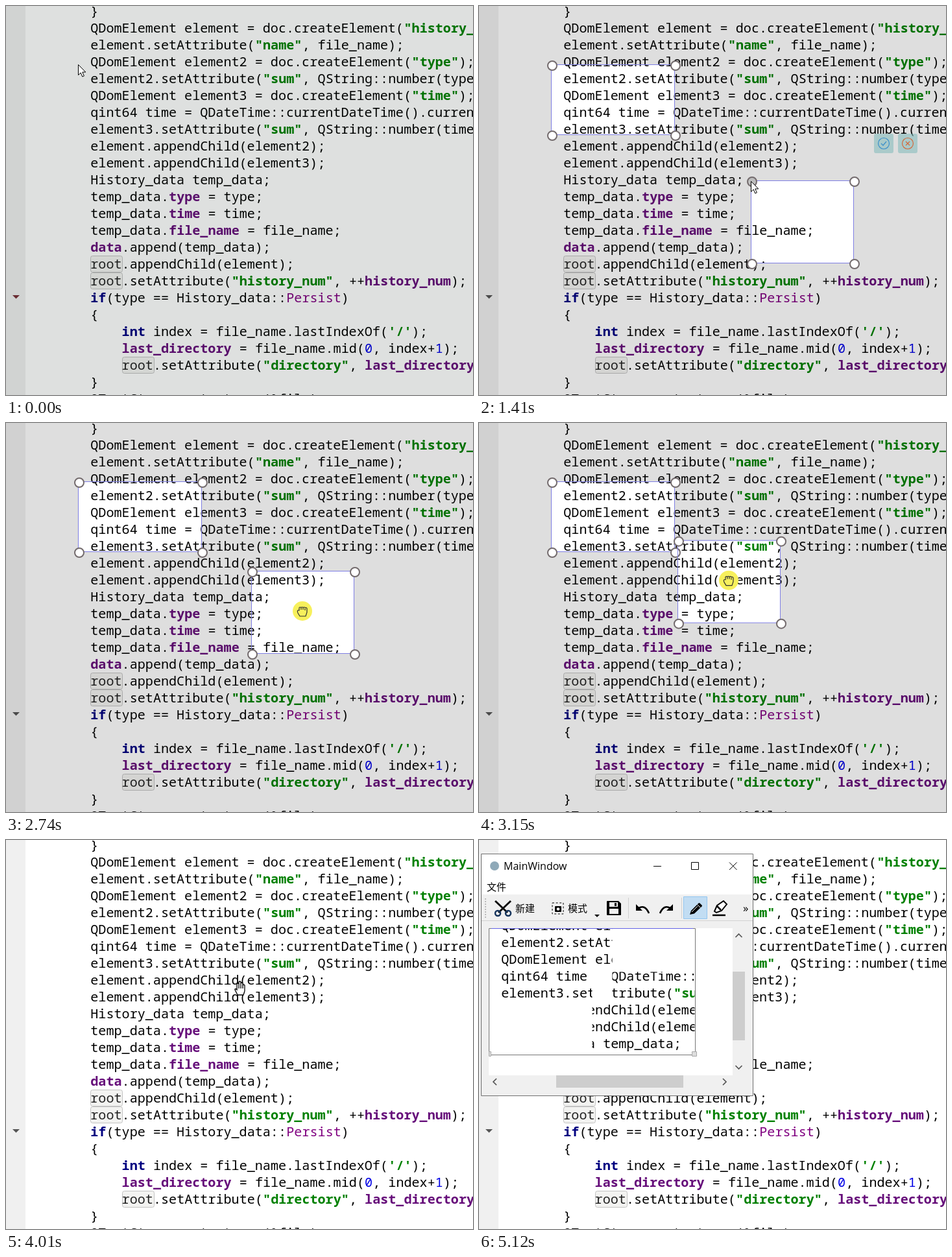
Write an HTML page with a canvas that moves like this. It is 720 px wide and 600 px high and loops after 5.72 s.

```html
<!DOCTYPE html>
<html lang="en">
<head>
<meta charset="utf-8">
<title>Region capture</title>
<style>
html, body { margin: 0; width: 720px; height: 600px; overflow: hidden; background: #fff }
canvas { display: block }
</style>
</head>
<body>
<canvas id="stage" width="720" height="600"></canvas>
<script>
const c = document.getElementById('stage').getContext('2d');
const LOOP = 5720, STEP = 200 / 3, CHAR = 12.08;
const MONO = '20.13px "Noto Sans Mono", monospace';
const PURPLE = '#660e7a';

const code = `}
QDomElement element = doc.createElement("history_data");
element.setAttribute("name", file_name);
QDomElement element2 = doc.createElement("type");
element2.setAttribute("sum", QString::number(type));
QDomElement element3 = doc.createElement("time");
qint64 time = QDateTime::currentDateTime().currentMSecsSinceEpoch();
element3.setAttribute("sum", QString::number(time));
element.appendChild(element2);
element.appendChild(element3);
History_data temp_data;
temp_data.type = type;
temp_data.time = time;
temp_data.file_name = file_name;
data.append(temp_data);
root.appendChild(element);
root.setAttribute("history_num", ++history_num);
if(type == History_data::Persist)
{
    int index = file_name.lastIndexOf('/');
    last_directory = file_name.mid(0, index+1);
    root.setAttribute("directory", last_directory);
}
QTextStream out_stream(&file);`.split('\n');

// Each rule: pattern, colour, bold
const rules = [
  [/"[^"]*"|'.'/, '#008000', true],
  [/\b(?:int|if)\b/, '#000080', true],
  [/(?<=temp_data\.)\w+|^data\b|\bhistory_num|\blast_directory/, PURPLE, true],
  [/\bPersist/, '#800080', false],
  [/\b\d\b/, '#0000e6', false],
  [/\broot\b/, '#222', false],
];
const lexer = new RegExp(rules.map(r => `(${r[0].source})`).join('|'), 'g');
const tokens = code.flatMap((line, row) => {
  const out = [];
  let from = 0;
  const add = (text, col, rule = []) => text.trim() && out.push({ text, row, col, color: rule[1] || '#000', bold: rule[2] });
  for (const m of line.matchAll(lexer)) {
    add(line.slice(from, m.index), from);
    add(m[0], m.index, rules[m.slice(1).findIndex(Boolean)]);
    from = m.index + m[0].length;
  }
  add(line.slice(from), from);
  return out;
});

function box(x, y, w, h, fill, stroke, r = 0) {
  c.beginPath();
  c.roundRect(x, y, w, h, r);
  if (fill) { c.fillStyle = fill; c.fill(); }
  if (stroke) { c.strokeStyle = stroke; c.lineWidth = 1; c.stroke(); }
}

function dot(x, y, r, fill, stroke, width = 1) {
  c.beginPath();
  c.arc(x, y, r, 0, 7);
  if (fill) { c.fillStyle = fill; c.fill(); }
  if (stroke) { c.strokeStyle = stroke; c.lineWidth = width; c.stroke(); }
}

function shape(x, y, d, fill, stroke, width = 1) {
  const path = new Path2D(d);
  c.save();
  c.translate(x, y);
  if (fill) { c.fillStyle = fill; c.fill(path); }
  if (stroke) { c.strokeStyle = stroke; c.lineWidth = width; c.stroke(path); }
  c.restore();
}

function label(text, x, y, font, color = '#000') {
  c.font = font;
  c.fillStyle = color;
  c.fillText(text, x, y);
}

function drawCode() {
  for (const t of tokens) {
    const x = 130.3 + t.col * CHAR, y = 15 + t.row * 26;
    if (t.text === 'root') box(Math.round(x) + .5, y - 19.5, 49, 25, '#f3f3f1', '#c2c2c2', 3);
    label(t.text, x, y, (t.bold ? 'bold ' : '500 ') + MONO, t.color);
  }
}

function drawEditor(foldColor) {
  box(0, 0, 720, 600, '#fff');
  box(0, 0, 30, 600, '#f0f0f0');
  shape(10, 446, 'M0 0h11l-5.5 5.5z', foldColor);
  drawCode();
}

// Overlapping areas cancel out
function areaPath(areas) {
  for (const a of areas) c.rect(a.x, a.y, a.w, a.h);
}

function drawOverlay(areas, tint, hot) {
  c.beginPath();
  c.rect(0, 0, 720, 600);
  areaPath(areas);
  c.fillStyle = tint;
  c.fill('evenodd');
  areas.forEach((a, i) => {
    box(a.x, a.y, a.w, a.h, null, '#7f7fe4');
    for (const dx of [0, a.w]) for (const dy of [0, a.h])
      dot(a.x + dx + 1.5, a.y + dy + 1.5, 7, hot && i && !dx && !dy ? '#bdbdbd' : '#fff', '#736b6d', 2);
  });
}

function drawButtons(x) {
  for (const [dx, color, mark] of [[0, '#3a8fcb', 'M-4 0l3 3 5-6'], [37, '#d4683a', 'M-3-3l6 6M3-3l-6 6']]) {
    box(x + dx - 15, 197, 30, 30, 'rgba(127,186,186,.55)', null, 3);
    dot(x + dx, 212, 8.5, null, color, 1.2);
    shape(x + dx, 212, mark, null, color, 1.2);
  }
}

function pencil(x, y) {
  shape(x, y, 'M0 0l2-6 11.5-11.5q1-1 2 0l3 3q1 1 0 2L7-1.5z', '#000');
  shape(x, y, 'M3-4l9-9M11.5-15.5l5 5', null, '#fff', 1);
}

function arrow(x, y) {
  shape(x, y, 'M.5.5v16l3.7-3.5 2.6 6 2.6-1.1-2.6-5.9h5z', '#fff', '#000');
}

function openHand(x, y) {
  shape(x, y, 'M-4 10l-4-8q0-3 3 0v-9q1.5-2 3 0v-3q1.5-2 3 0v2q2-2 3 0v3q2-1.5 3 0v9l-2 6zM-2-7v7M1-8v8M4-5v5', '#fff', '#000', 1.3);
}

function fistHand(x, y) {
  dot(x, y, 15, '#f7f05c');
  shape(x, y, 'M-4 8l-3-5q-2-5 2-4v-4q1.5-2 3 0 1.5-2.5 3 0 1.5-2 3 0 2-1 3 1v6l-2 6zM-2-5v3M1-5v3M4-4v3', null, '#333', 1.2);
}

function drawToolbar() {
  const cjk = '15px "Noto Sans CJK SC", sans-serif';
  label('文件', 12, 78, cjk);
  label('新建', 56, 111, cjk);
  label('模式', 137, 111, cjk);
  for (let y = 90; y < 121; y += 4) box(9, y, 2, 2, '#bbb');
  // Scissors
  shape(37, 105, 'M-12-11L7 7M12-11L-7 7', null, '#111', 3);
  for (const dx of [-8, 8]) dot(37 + dx, 113, 4, null, '#16345c', 2.5);
  // Area mode
  c.setLineDash([3, 2.6]);
  box(113, 97, 17, 17, null, '#000');
  c.setLineDash([]);
  box(117, 102, 10, 9, '#000', null, 1);
  dot(122, 106.5, 2.3, '#fff');
  shape(178, 115, 'M0 0h8l-4 4z', '#000');
  // Save
  shape(197, 94, 'M1 0h17l4 4v17q0 1-1 1H1q-1 0-1-1V1q0-1 1-1z', '#000');
  box(201, 96, 13, 7, '#f0f0f0');
  box(209, 97, 3, 5, '#000');
  box(201, 106, 14, 8, '#f0f0f0');
  for (const x of [230, 312]) box(x, 89, 1, 32, '#d0d0d0');
  // Undo and its mirror image, redo
  const undo = () => {
    shape(242, 102, 'M4 3q10-6 16 8', null, '#000', 2.6);
    shape(242, 102, 'M0-3v10h10z', '#000');
  };
  undo();
  c.save();
  c.translate(541, 0);
  c.scale(-1, 1);
  undo();
  c.restore();
  // Pen and marker
  box(315.5, 87.5, 36, 34, '#c2ddf3', '#92c5f0');
  pencil(325, 115);
  shape(360, 94, 'M3 16l4-9L17 0l5 5-8 10-8 3z', '#fff', '#000', 2);
  shape(360, 94, 'M7 8l6 6M0 22h20', null, '#000', 2.5);
  label('»', 407, 111, '17px "Open Sans", sans-serif');
}

function drawWindow(areas) {
  box(3.5, 21.5, 419, 373, '#f0f0f0', '#707070');
  box(4, 22, 418, 62, '#fff');
  dot(24, 40, 7, '#8fa9b8');
  label('MainWindow', 38, 46, '16px "Open Sans", sans-serif');
  box(269, 40, 12, 1, '#000');
  box(327.5, 34.5, 11, 11, null, '#000');
  shape(386, 34.5, 'M0 0l11.5 11.5M11.5 0L0 11.5', null, '#000');
  drawToolbar();
  box(4, 124, 418, 1, '#d2d2d2');

  box(15, 136, 376, 227, '#fff');
  c.save();
  c.translate(-96, 46);
  c.beginPath();
  areaPath(areas);
  c.clip('evenodd');
  drawCode();
  c.restore();
  box(15.5, 136.5, 318, 195, null, '#777');
  box(19, 136, 311, 1, '#6464e8');
  box(15.5, 326.5, 3, 7, '#ddd', '#aaa');
  box(328.5, 326.5, 7, 7, '#ddd', '#aaa');

  box(391, 203, 19, 106, '#cdcdcd');
  box(119, 363, 196, 19, '#cdcdcd');
  for (const [x, y, d] of [[400.5, 147, 'M-5 3l5-5 5 5'], [400.5, 351, 'M-5-3l5 5 5-5'], [24, 373, 'M3-5l-5 5 5 5'], [379, 373, 'M-3-5l5 5-5 5']])
    shape(x, y, d, null, '#555', 1.7);
}

// Pointer path: step, x, y
const path = [
  [0, 111, 90], [3, 111, 90], [7, 302, 199], [9, 347, 212], [12, 420, 270], [16, 578, 397],
  [21, 419, 270], [22, 419, 270], [31, 497, 330], [35, 497, 330], [38, 490, 323], [39, 490, 323],
  [41, 456, 289], [50, 348, 218], [55, 361, 229], [68, 361, 229], [76, 745, 160], [99, 745, 160],
];

function pointerAt(k) {
  const i = path.findIndex(p => p[0] > k);
  const [t0, x0, y0] = path[i - 1], [t1, x1, y1] = path[i];
  const u = (k - t0) / (t1 - t0);
  return { x: x0 + (x1 - x0) * u, y: y0 + (y1 - y0) * u };
}

function areasAt(k) {
  const areas = [];
  if (k > 3) {
    const p = pointerAt(Math.min(k, 7));
    areas.push({ x: 111.5, y: 90.5, w: p.x - 112, h: p.y - 91 });
  }
  if (k > 12) {
    const p = pointerAt(Math.min(k, 16)), q = pointerAt(Math.max(35, Math.min(k, 50)));
    areas.push({ x: q.x - 77.5, y: q.y - 60.5, w: p.x - 420, h: p.y - 270 });
  }
  return areas;
}

function draw(ms) {
  const k = Math.floor(ms / STEP + .05);
  const p = pointerAt(k), areas = areasAt(k);
  const idle = k < 4;
  const dragging = k > 35 && k < 50;
  const drawing = k < 8 || k > 12 && k < 17;
  drawEditor(idle ? '#7a3038' : '#555');
  if (k < 60) {
    drawOverlay(areas, idle ? 'rgba(0,17,10,.13)' : 'rgba(0,0,0,.13)', k > 20 && k < 24);
    if (!drawing && !dragging) drawButtons(Math.max(...areas.map(a => a.x + a.w)) + 46.5);
  } else if (k > 60) {
    c.save();
    if (k === 61) {
      c.globalAlpha = .6;
      c.translate(213, 208);
      c.scale(.96, .96);
      c.translate(-213, -208);
    }
    drawWindow(areas);
    c.restore();
  }
  if (dragging) fistHand(p.x + 1, p.y + 1);
  else if (k > 60 && p.x < 391) pencil(p.x + 2, p.y - 2);
  else if (k > 27 && k < 61) openHand(p.x, p.y);
  else arrow(p.x, p.y);
}

function tick() {
  draw(performance.now() % LOOP);
  requestAnimationFrame(tick);
}
tick();
</script>
</body>
</html>
```
